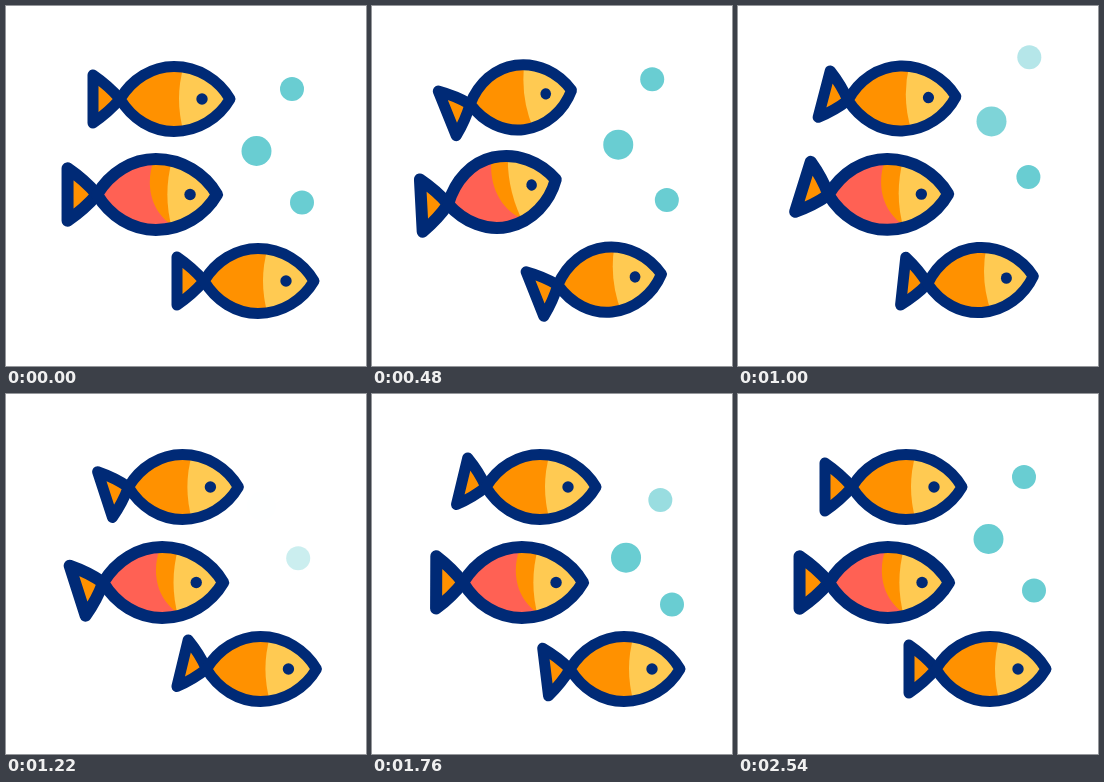
An HTML page for the animation above (2600 ms loop, 360 by 360 pixels).

```html
<!DOCTYPE html>
<html lang="en">
<head>
<meta charset="utf-8">
<title>Three fish</title>
<style>
html, body { margin: 0; width: 100%; height: 100%; overflow: hidden; background: #fff; }
svg { display: block; width: 360px; height: 360px; }
.line { stroke: #002a76; stroke-linejoin: round; vector-effect: non-scaling-stroke; }
</style>
</head>
<body>
<svg id="stage" viewBox="0 0 360 360"></svg>
<script>
const LOOP = 2600;
const NAVY = '#002a76', ORANGE = '#ff9100', YELLOW = '#ffca52', RED = '#ff6154', TEAL = '#69cdd2';
// Fish parts are drawn around the joint between tail and body.
const BODY = 'M0,0C12,-20 32,-32.5 54,-32.5C78,-32.5 99,-19 110,0C99,19 78,32.5 54,32.5C32,32.5 12,20 0,0Z';
const TAIL = 'M0,0Q-11,-13 -27,-24V24Q-11,13 0,0Z';
const BELLY = 'M53,-34C44,-12 47,16 73,31V34H120V-34Z';
const stage = document.getElementById('stage');

function add(parent, tag, attrs = {}) {
  const el = document.createElementNS('http://www.w3.org/2000/svg', tag);
  for (const name in attrs) el.setAttribute(name, attrs[name]);
  parent.appendChild(el);
  return el;
}

const part = (t, from, to) => Math.min(1, Math.max(0, (t - from) / (to - from)));
const ease = (t, from, to) => {
  const u = part(t, from, to);
  return u * u * (3 - 2 * u);
};

// late: delay of the dart; beat and zero: period and phase of the tail wag.
const school = [
  { x: 114, y: 93, size: 1, face: 59, eye: 82, late: 70, beat: 390, zero: 928, back: 18.5, sink: 6, turn: 9 },
  { x: 91, y: 188.5, size: 1.091, face: 64.5, eye: 85.3, late: 0, beat: 440, zero: 1760, back: 15, sink: 9.7, turn: 13, red: true },
  { x: 198, y: 275, size: 1, face: 59, eye: 82, late: 130, beat: 300, zero: 580, back: 18.5, sink: 6, turn: 9 }
];

// late: delay of the way up; early: head start of the return from below.
const bubbles = [
  { x: 286, y: 83, r: 12, late: 0, early: 0, sway: 1.4 },
  { x: 250.5, y: 145, r: 15, late: 80, early: 120, sway: 1.3 },
  { x: 296, y: 196.5, r: 12, late: 190, early: 240, sway: 0.8 }
];

function build() {
  for (const b of bubbles) b.el = add(stage, 'circle', { r: b.r, fill: TEAL });
  const clip = add(add(stage, 'defs'), 'clipPath', { id: 'skin' });
  add(clip, 'path', { d: BODY });
  for (const f of school) {
    const outline = { class: 'line', 'stroke-width': 11 * f.size };
    const edge = f.face + 5;
    f.root = add(stage, 'g');
    f.tail = add(f.root, 'path', { d: TAIL, fill: ORANGE, ...outline });
    f.body = add(f.root, 'g');
    const inside = add(f.body, 'g', { 'clip-path': 'url(#skin)' });
    add(inside, 'path', { d: BODY, fill: f.red ? RED : ORANGE });
    if (f.red) add(inside, 'path', { d: BELLY, fill: ORANGE });
    add(inside, 'path', { d: `M${edge},-34Q${edge - 10},0 ${edge},34H120V-34Z`, fill: YELLOW });
    add(f.body, 'circle', { cx: f.eye, cy: 0, r: 5.7 / f.size, fill: NAVY });
    add(f.body, 'path', { d: BODY, fill: 'none', ...outline });
  }
}

// Draw back, dart forward past the resting place, then drift home.
function drawFish(f, time) {
  const t = time - f.late;
  const pull = ease(t, 120, 500) - ease(t, 680, 1040);
  const push = 9 * ease(t, 1050, 1170) * (1 - part(t, 1170, 1600)) ** 3;
  const effort = ease(time, 120, 500) - ease(time, 1950, 2540);
  const wag = 18 * effort * Math.sin(2 * Math.PI * (time - f.zero) / f.beat);
  f.root.setAttribute('transform',
    `translate(${f.x - f.back * pull + push},${f.y + f.sink * pull}) rotate(${-f.turn * pull}) scale(${f.size})`);
  f.tail.setAttribute('transform', `rotate(${wag}) scale(${1 - 0.09 * effort},1)`);
  f.body.setAttribute('transform', `scale(${1 - 0.08 * pull},1)`);
}

// Rise and fade away, then come back up from below.
function drawBubble(b, time) {
  const up = time - b.late, home = time + b.early;
  let { x, y } = b, alpha;
  if (time < 1380) {
    const u = ease(up, 120, 1120);
    x -= 6 * Math.sin(Math.PI * b.sway * u);
    y -= 33 * u;
    alpha = 1 - ease(up, 850, 1150);
  } else {
    const u = ease(home, 1450, 2540);
    x += 4 * Math.sin(Math.PI * u);
    y += 28.6 * (1 - u);
    alpha = ease(home, 1630, 1840);
  }
  b.el.setAttribute('cx', x);
  b.el.setAttribute('cy', y);
  b.el.setAttribute('opacity', alpha);
}

function draw(time) {
  for (const b of bubbles) drawBubble(b, time);
  for (const f of school) drawFish(f, time);
}

build();
const start = performance.now();
function tick() {
  draw((performance.now() - start) % LOOP);
  requestAnimationFrame(tick);
}
draw(0);
requestAnimationFrame(tick);
</script>
</body>
</html>
```
